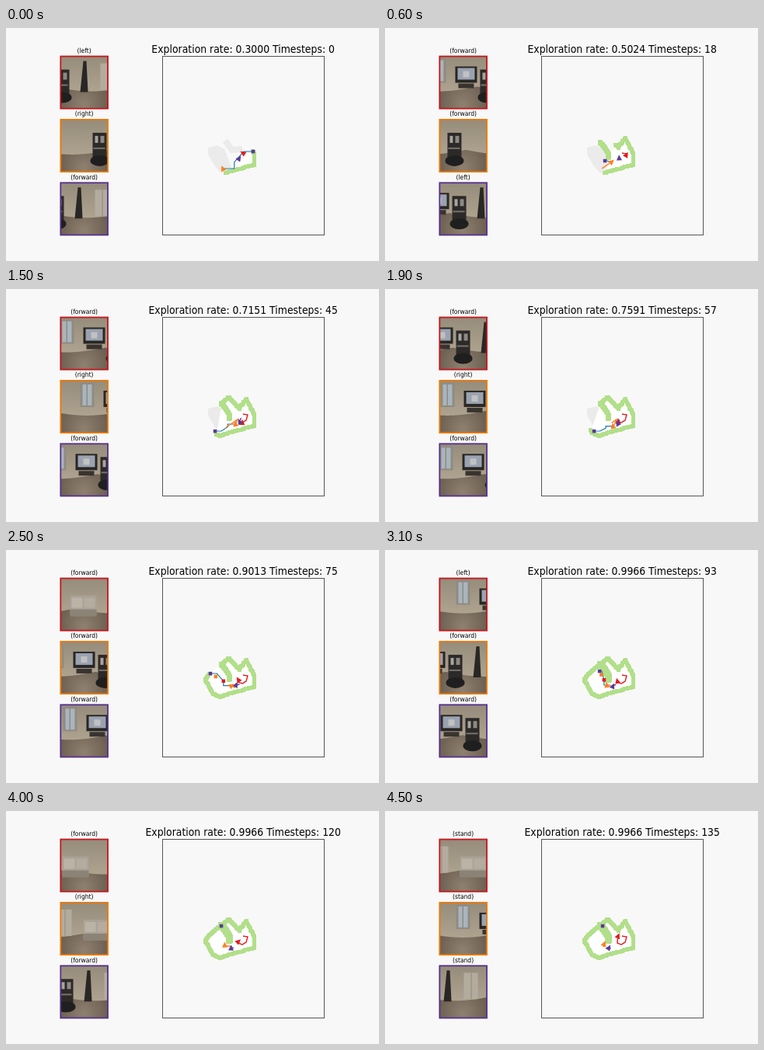
Animation, 480 px wide and 300 px high, one loop 4600 ms. Source, as an HTML page with a canvas:

```html
<!DOCTYPE html>
<html>
<head>
<meta charset="utf-8">
<style>
html, body { margin: 0; width: 480px; height: 300px; overflow: hidden; background: #f8f8f8; }
canvas, svg { position: absolute; left: 0; top: 0; }
text { font-family: "DejaVu Sans", sans-serif; font-size: 8.4px; text-anchor: middle; }
#title { font-size: 13.85px; }
</style>
</head>
<body>
<canvas id="stage" width="480" height="300"></canvas>
<svg width="480" height="300">
  <!-- the whole plot is 10% narrower than square -->
  <g transform="scale(.9 1)">
    <text id="title" x="339.1" y="32"></text>
    <text class="action" x="111.8" y="32"></text>
    <text class="action" x="111.8" y="113.5"></text>
    <text class="action" x="111.8" y="195"></text>
  </g>
</svg>
<script>
const ctx = document.getElementById('stage').getContext('2d');
const title = document.getElementById('title');
const labels = document.querySelectorAll('.action');

const STEP = 100, STEPS = 46;
const KEYS = [0, 11, 19, 25, 31, 40, 45];
const RATES = [.3, .6711, .7591, .9013, .9966, .9966, .9966];
const ACTIONS = { L: 'left', R: 'right', F: 'forward', S: 'stand' };
const VIEW_W = 61, VIEW_H = 67.2, AROUND = 300;
const GREEN = '#b2df8a', GREY = '#ebebeb';

// Path points are evenly spaced in time; headings and actions go with KEYS
const AGENTS = [
  { color: '#e31a1c', frame: '#c4161c', actions: 'LFFFLFS', memory: 45,
    headings: [140, 32, 112, 212, 50, 222, 198],
    path: [[305, 161], [311, 162], [309, 169], [304, 172], [299, 170], [299, 167], [299, 169], [299, 168], [299, 168], [300, 161]] },
  { color: '#ff7f1e', frame: '#ee7900', actions: 'RFRFFRS', memory: 13,
    headings: [265, 22, 70, 85, 122, 195, 50],
    path: [[279, 181], [298, 168], [294, 177], [289, 174], [281, 174], [282, 171]] },
  { color: '#5b3a96', frame: '#55308d', actions: 'FLFFFFS', memory: 8,
    headings: [147, 92, 72, 68, 100, 135, 160],
    path: [[300, 168], [302, 167], [300, 173], [295, 174], [291, 177], [288, 176]] }
];
const GOALS = [[318, 159], [283, 171], [269, 183], [263, 159], [276, 156], [277, 148], [280, 148]];

// Room outline, from the bottom edge counterclockwise on screen
const ROOM = [[283, 186], [319.5, 176], [319.5, 162], [309, 142], [300, 154], [287, 139],
  [277, 147], [259, 162], [257, 168], [267, 186], [276, 189], [283, 186]];
const ISLAND = [[277, 147], [283, 154], [288, 163], [287, 168]];
const ALCOVE = [[260, 154], [272, 151], [281, 156], [290, 179], [277, 187], [269, 178], [260, 163]];
const ARM = [[282, 145], [291, 157], [304, 156]];

// Things along the wall, seen all the way round: centre -> painter
const THINGS = [[50, windowPane], [85, screen], [112, robot], [140, pole], [170, door], [210, sofa], [285, robot]];

const clamp = v => Math.min(1, Math.max(0, v));
const mix = (a, b, f) => a + (b - a) * f;
const mixPoint = (a, b, f) => a.map((v, i) => mix(v, b[i], f));
const gap = (a, b) => Math.hypot(b[0] - a[0], b[1] - a[1]);
const wrap = v => ((v + AROUND / 2) % AROUND + AROUND) % AROUND - AROUND / 2;
const noise = n => { const v = Math.sin(n * 127.1) * 43758.5; return v - Math.floor(v); };

function box(color, x, y, w, h) {
  ctx.fillStyle = color;
  ctx.fillRect(x, y, w, h);
}

function trace(points) {
  ctx.beginPath();
  points.forEach(p => ctx.lineTo(...p));
}

function shape(color, points) {
  ctx.fillStyle = color;
  trace(points);
  ctx.fill();
}

function line(color, points, width = 1.2) {
  ctx.strokeStyle = color;
  ctx.lineWidth = width;
  trace(points);
  ctx.stroke();
}

function square(color, [x, y]) {
  box(color, x - 2.2, y - 2.2, 4.5, 4.5);
}

function dots(path, spacing) {
  return path.slice(1).flatMap((b, i) => {
    const a = path[i], count = Math.ceil(gap(a, b) / spacing);
    return Array.from({ length: count }, (_, j) => mixPoint(a, b, j / count));
  });
}

// Things stand on the floor around x = 0

function windowPane() {
  box('#8f8b82', -9, 3, 18, 31);
  box('#a9b5bd', -6, 5, 12, 27);
  box('#8f8b82', -1, 3, 1.5, 31);
}

function screen() {
  box('#292725', -14, 13, 28, 21);
  box('#9aa2b0', -11, 15, 22, 15);
  box('#c0c1c2', -4, 19, 8, 8);
  box('#38332f', -10, 35, 20, 6);
}

function robot() {
  box('#2c2a29', -9, 17, 18, 34);
  box('#a8a49c', -6, 21, 4, 9);
  box('#8d8982', 1, 21, 5, 9);
  box('#77716a', -8, 36, 15, 2);
  ctx.fillStyle = '#201f1f';
  ctx.beginPath();
  ctx.ellipse(0, 53, 12, 7, 0, 0, 7);
  ctx.fill();
}

function pole() {
  shape('#292725', [[-1, 6], [3, 6], [5, 46], [-5, 46]]);
}

function door() {
  box('#b3ac9e', -9, 9, 18, 34);
  box('#918878', 0, 9, 1, 34);
}

function sofa() {
  box('#aaa297', -16, 22, 34, 24);
  box('#bbb3a6', -14, 25, 14, 13);
  box('#b4ac9f', 2, 25, 14, 13);
  box('#8b8376', -16, 40, 34, 9);
}

function camera(n, { frame, headings, actions }, { from, next, f, key }) {
  const y = 36.5 + n * 81.4;
  const heading = headings[from] + wrap(headings[next] - headings[from]) * f;
  ctx.save();
  ctx.translate(70, y);
  ctx.beginPath();
  ctx.rect(0, 0, VIEW_W, VIEW_H);
  ctx.clip();

  const wall = ctx.createLinearGradient(0, 0, 0, 45);
  wall.addColorStop(0, '#968c7b');
  wall.addColorStop(1, '#aea38f');
  box(wall, 0, 0, VIEW_W, VIEW_H);
  const floor = ctx.createRadialGradient(30, 62, 2, 30, 58, 36);
  floor.addColorStop(0, '#8d7f6e');
  floor.addColorStop(1, '#675a4d');
  // The wall foot rises towards each corner of the room
  const edge = Array.from({ length: VIEW_W + 1 }, (_, x) =>
    [x, 39 + 6 * Math.abs(Math.sin((heading + x - 30) * Math.PI / 100))]);
  shape(floor, [...edge, [VIEW_W, VIEW_H], [0, VIEW_H]]);

  THINGS.forEach(([place, paint]) => {
    ctx.save();
    ctx.translate(VIEW_W / 2 + wrap(place - heading), 0);
    paint();
    ctx.restore();
  });
  ctx.restore();

  ctx.strokeStyle = frame;
  ctx.lineWidth = 1.8;
  ctx.strokeRect(70.3, y, VIEW_W - .3, VIEW_H);
  labels[n].textContent = `(${ACTIONS[actions[key]]})`;
}

function blocks(points, size) {
  points.forEach(([x, y]) => {
    const seed = Math.round(x * 3 + y * 7);
    box(GREEN, Math.round(x - size / 2 + noise(seed) - .5),
      Math.round(y - size / 2 + noise(seed + 9) - .5), size, size);
  });
}

const outline = dots(ROOM, 1.5), island = dots(ISLAND, 1.5);

// Exploration follows the outline one way, then the rest from the other end
function explored(rate) {
  const turn = .64, count = outline.length;
  const ahead = outline.slice(0, Math.round(Math.min(rate, turn) * count));
  const back = outline.slice(Math.round((1 - Math.max(0, rate - turn)) * count));
  return [...back, ...ahead];
}

function position({ path }, step) {
  const t = step / (STEPS - 1) * (path.length - 1), i = Math.min(Math.floor(t), path.length - 2);
  return mixPoint(path[i], path[i + 1], t - i);
}

function arrow({ color }, [x, y], angle) {
  ctx.save();
  ctx.translate(x, y);
  ctx.rotate(angle);
  shape(color, [[4.2, 0], [-3, -3.5], [-3, 3.5]]);
  ctx.restore();
}

function map(step, rate, key) {
  const seen = explored(rate);
  if (rate < .85) shape(GREY, ALCOVE);
  if (rate < .5) line(GREY, ARM, 8);
  shape('#fff', seen);
  blocks(seen, 5);
  if (rate > .5) blocks(island, rate > .95 ? 8 : 6);

  const goal = GOALS[key], [red, orange, purple] = AGENTS;
  if (step < 36) {
    const end = position(orange, step), middle = mixPoint(goal, end, .62);
    line('#1f78b4', [goal, [mix(goal[0], middle[0], .5), goal[1]], middle, [middle[0], end[1]], end]);
    if (rate > .85) {
      square(red.color, middle);
      square(orange.color, mixPoint(goal, end, .25));
    }
  }
  square(purple.color, goal);

  AGENTS.forEach((agent, n) => {
    const past = [];
    for (let s = Math.max(0, step - agent.memory); s <= step; s++) past.push(position(agent, s));
    line(agent.color, past, 1.4);
    arrow(agent, past.at(-1), -Math.PI / 2 + (noise(key * 3 + n) - .5) * 2);
  });
  ctx.strokeStyle = '#555';
  ctx.lineWidth = 1;
  ctx.strokeRect(201.5, 36.5, 208, 230);
}

function moment(step) {
  const from = Math.min(KEYS.findLastIndex(k => k <= step), KEYS.length - 2), next = from + 1;
  const f = (step - KEYS[from]) / (KEYS[next] - KEYS[from]);
  return { from, next, f, key: f < .5 ? from : next };
}

function draw(now) {
  const step = Math.floor(now / STEP) % STEPS;
  const time = moment(step);
  const rate = mix(RATES[time.from], RATES[time.next], time.f);
  box('#f8f8f8', 0, 0, 480, 300);
  AGENTS.forEach((agent, n) => camera(n, agent, time));
  map(step, rate, time.key);
  title.textContent = `Exploration rate: ${rate.toFixed(4)} Timesteps: ${step * 3}`;
}

const start = performance.now();
function tick() {
  draw(performance.now() - start);
  requestAnimationFrame(tick);
}
tick();
</script>
</body>
</html>
```
